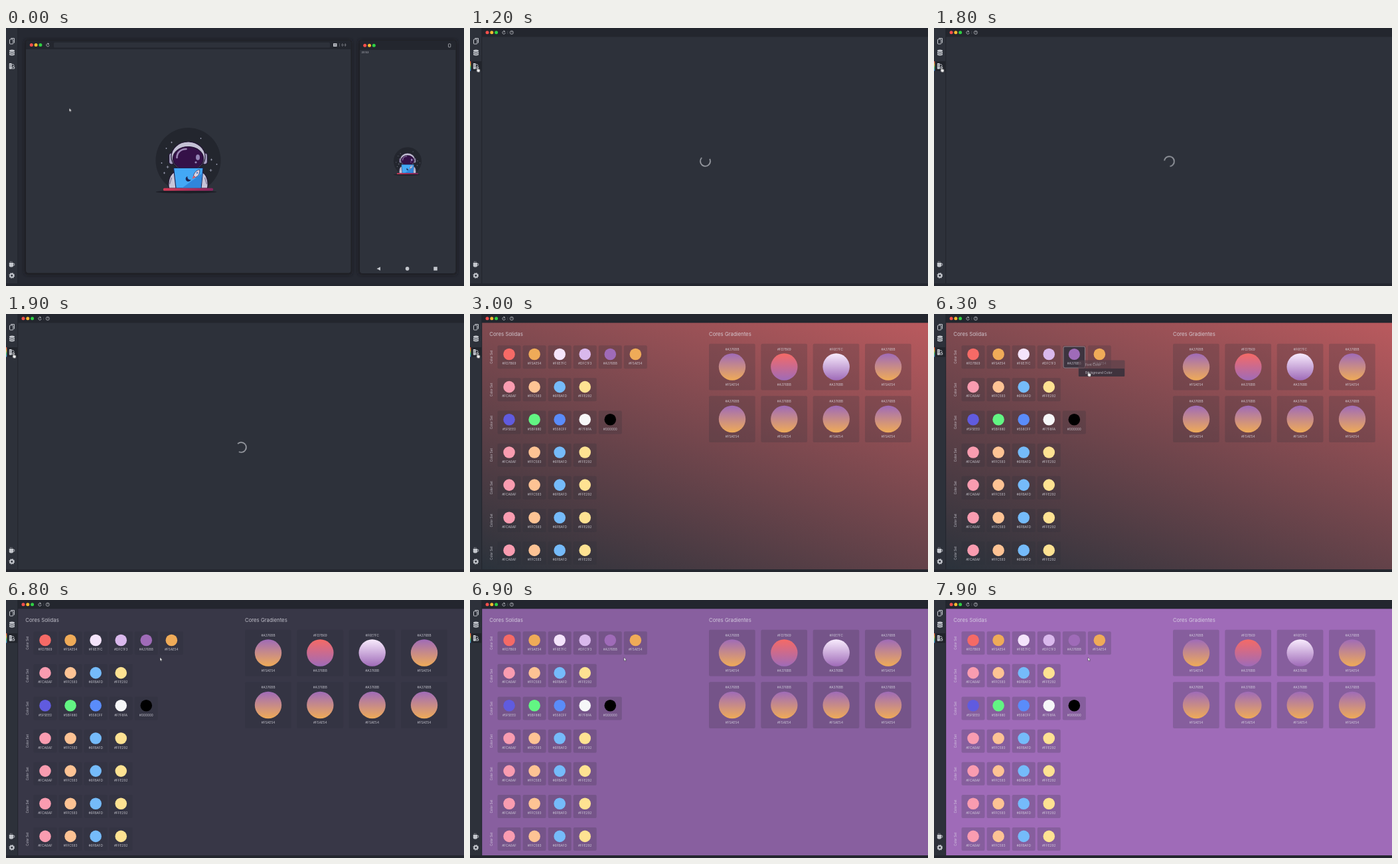
Write an HTML page that moves like this. It is 690 px wide and 388 px high and loops after 8 s.

```html
<!DOCTYPE html>
<html lang="pt">
<head>
<meta charset="utf-8">
<title>Color palette</title>
<style>
html, body { margin: 0; width: 100%; height: 100%; overflow: hidden; background: #262932; }
svg { display: block; width: 100%; height: 100%; }
text { font-family: Inter, "Open Sans", sans-serif; fill: #e3e4ec; fill-opacity: .8; }
.mid { text-anchor: middle; }
.tag { font-size: 4.75px; }
.head { font-size: 7.75px; }
.icon { fill: none; stroke: #c3c6cc; stroke-width: 1; }
.solid { fill: #c3c6cc; }
.card { fill: #2d313a; fill-opacity: .21; }

#home, #app, #wait, #board, #tint, #fade, #pick, #menu, #row, #hover, #bar, #arrow, #hand, #cur {
  animation: 8s step-end infinite;
}
#home { animation-name: home; }
#app, #bar { animation-name: app; }
#wait { animation-name: wait; }
#board { animation-name: board; }
#tint { animation-name: tint; }
#fade { animation-name: fade; }
#pick { animation-name: pick; }
#menu { animation-name: menu; }
#row { animation-name: row; }
#hover { animation-name: hover; }
#arrow { animation-name: arrow; }
#hand { animation-name: hand; }
#cur { animation-name: cur; animation-timing-function: ease-in-out; }
#spin { animation: spin 1s linear -.2s infinite; }

@keyframes home { 0% { opacity: 1 } 14.8%, 100% { opacity: 0 } }
@keyframes app { 0% { opacity: 0 } 14.8%, 100% { opacity: 1 } }
@keyframes wait { 0% { opacity: 0 } 14.8% { opacity: 1 } 24.8%, 100% { opacity: 0 } }
@keyframes board { 0% { opacity: 0 } 24.8%, 100% { opacity: 1 } }
@keyframes tint { 0% { opacity: 1 } 84.7%, 100% { opacity: 0 } }
@keyframes fade {
  0% { opacity: 0 }
  84.69% { opacity: 0; animation-timing-function: ease }
  87.8%, 100% { opacity: 1 }
}
@keyframes pick { 0% { opacity: 0 } 43.5% { opacity: 1 } 84.7%, 100% { opacity: 0 } }
@keyframes menu {
  0% { opacity: 0 }
  56% { opacity: 0; animation-timing-function: ease }
  58% { opacity: 1 }
  84.7%, 100% { opacity: 0 }
}
@keyframes row { 0% { opacity: 0 } 68.5%, 100% { opacity: 1 } }
@keyframes hover { 0% { opacity: 0 } 5.6%, 100% { opacity: 1 } }
@keyframes hand { 0% { opacity: 0 } 5.6% { opacity: 1 } 38.6% { opacity: 0 } 68.5% { opacity: 1 } 84.7%, 100% { opacity: 0 } }
@keyframes arrow { 0% { opacity: 1 } 5.6% { opacity: 0 } 38.6% { opacity: 1 } 68.5% { opacity: 0 } 84.7%, 100% { opacity: 1 } }
@keyframes cur {
  0%, .6% { transform: translate(95.3px, 120.5px) }
  6%, 37.8% { transform: translate(10.6px, 58.6px) }
  43.7% { transform: translate(206px, 64px) }
  48%, 62% { transform: translate(217.2px, 67.3px) }
  71%, 100% { transform: translate(232px, 86.3px) }
}
@keyframes spin { to { transform: rotate(360deg) } }
</style>
</head>
<body>
<svg viewBox="0 0 690 388" preserveAspectRatio="none">
  <defs>
    <!-- 20deg sweep across the 672 x 371 page -->
    <linearGradient id="warm" gradientUnits="userSpaceOnUse" x1="256" y1="472" x2="452" y2="-74">
      <stop offset="0" stop-color="#2a323b"/><stop offset="1" stop-color="#ba5a5e"/>
    </linearGradient>
    <linearGradient id="rainbow" x2="0" y2="1">
      <stop offset="0" stop-color="#f0524f"/><stop offset=".35" stop-color="#f3c44c"/>
      <stop offset=".65" stop-color="#4fd07a"/><stop offset="1" stop-color="#4d8df0"/>
    </linearGradient>
    <linearGradient id="desk">
      <stop offset="0" stop-color="#d63a55"/><stop offset="1" stop-color="#86245f"/>
    </linearGradient>
    <filter id="soft" x="-10%" y="-10%" width="120%" height="120%"><feGaussianBlur stdDeviation="2"/></filter>
    <g id="lights">
      <circle r="2.5" fill="#fb4f4b"/><circle cx="6.8" r="2.5" fill="#fbbb30"/><circle cx="13.6" r="2.5" fill="#2fd144"/>
    </g>
    <path id="reload" class="icon" stroke-width=".8" d="M1.6 -1.4A2.2 2.2 0 1 0 2.2 .4M-.2 -2.9L1.7 -1.5L-.2 -.4" style="stroke-width:.8"/>
    <g id="astro">
      <circle r="49" fill="#23262e"/>
      <g id="stars" stroke="#aeb1c6" stroke-width=".7"></g>
      <ellipse cx="-3" cy="47.5" rx="46" ry="2" fill="#1b1d25"/>
      <g stroke="#211432" stroke-width="1.2">
        <path d="M-19 17C-28 20 -31 32 -29 42H-17ZM19 17C28 20 31 32 29 42H17Z" fill="#c8c5d8"/>
        <rect x="-29" y="-11" width="8" height="17" rx="4" fill="#a5a1c0"/>
        <rect x="21" y="-11" width="8" height="17" rx="4" fill="#a5a1c0"/>
        <ellipse cy="-6" rx="25.5" ry="22" fill="#c4c1d5"/>
        <ellipse cy="-3" rx="23" ry="17.5" fill="#351148"/>
      </g>
      <path d="M-17 -4C-17 -12 -11 -17 -3 -17" fill="none" stroke="#9c86b5" stroke-width="2.6" stroke-linecap="round"/>
      <path d="M-25 26L-28 36M25 26L28 36" stroke="#7d7897" stroke-width="1.2"/>
      <ellipse cx="14.5" cy="-4.5" rx="3" ry="4.3" fill="#9484b5"/><circle cx="11.5" cy="3" r="1.6" fill="#9484b5"/>
      <path d="M-22 11.5H22.5L19.5 42H-18.5Z" fill="#43a8f6" stroke="#1b2250" stroke-width="1.2" stroke-linejoin="round"/>
      <path d="M21.7 19L19 41.4H-9Z" fill="#2f86dc"/>
      <path d="M-1 24A4 4 0 1 0 4 29A4 4 0 0 1 -1 24Z" fill="#1c2352"/>
      <path d="M17 14C12 15 9 19 8 23L11 25.500C15 24 18 20 17 14Z" fill="#d5d3e4" stroke="#3a2346" stroke-width=".7"/>
      <path d="M8 23L6 28L11 25.500Z" fill="#e85a5f"/><circle cx="13.500" cy="18.800" r="1.300" fill="#4b79c4"/>
      <rect x="-37.500" y="41.700" width="75" height="4" rx="1.500" fill="url(#desk)"/>
    </g>
  </defs>

  <rect width="690" height="388" fill="#262932"/>

  <g id="home">
    <rect x="28" y="18" width="493" height="353" rx="4" fill="#1b1d24" filter="url(#soft)"/>
    <rect x="531" y="18" width="148" height="353" rx="4" fill="#1b1d24" filter="url(#soft)"/>
    <rect x="30" y="19" width="489.500" height="349.500" rx="4" fill="#2e323b"/>
    <path d="M30 32V23Q30 19 34 19H515.500Q519.500 19 519.500 23V32Z" fill="#23262e"/>
    <rect x="72" y="21.800" width="416" height="7.600" rx="1.500" fill="#2d313a"/>
    <use href="#lights" x="38.300" y="25.500"/>
    <use href="#reload" x="63" y="25.500"/>
    <rect x="493" y="23" width="5.500" height="5" rx=".6" class="solid"/>
    <path d="M494.300 24.500H497.200M494.300 26.300H497.200" stroke="#3c4049" stroke-width=".7"/>
    <path d="M502.500 23V28" stroke="#70747c" stroke-width=".6"/>
    <path class="icon" style="stroke-width:.7" d="M507 23.500Q505.500 25.500 507 27.500M511 23.500Q512.500 25.500 511 27.500M508 25.600H508.700M509.400 25.600H510.100"/>
    <rect x="533" y="19" width="144.500" height="350" rx="4" fill="#2e323b"/>
    <path d="M533 33V23Q533 19 537 19H673.500Q677.500 19 677.500 23V33Z" fill="#23262e"/>
    <use href="#lights" x="540.700" y="26.300"/>
    <rect class="icon" style="stroke-width:.7" x="666.500" y="23.800" width="3.300" height="5" rx=".6"/>
    <text x="535.500" y="37.600" font-size="4">20:53</text>
    <path class="solid" d="M558.500 362L564 359.200V364.800Z"/>
    <circle class="solid" cx="604.600" cy="361.900" r="2.800"/>
    <rect class="solid" x="644.300" y="359.200" width="5.500" height="5.500"/>
    <use href="#astro" transform="translate(274.500 199)"/>
    <use href="#astro" transform="translate(605 200.300) scale(.43)"/>
  </g>

  <g id="app">
    <rect x="18" width="672" height="388" fill="#2d313a"/>
    <g id="wait">
      <g transform="translate(354.500 200.500)">
        <path id="spin" class="icon" style="stroke-width:1.200" d="M-7.500 -1A7.500 7.500 0 1 1 1 7.500"/>
      </g>
    </g>
    <g id="board">
      <rect id="tint" x="18" y="13" width="672" height="371" fill="url(#warm)"/>
      <rect id="fade" x="18" y="13" width="672" height="371" fill="#9f6bb8"/>
      <text class="head" x="29.300" y="33.200">Cores Solidas</text>
      <text class="head" x="360" y="33.200">Cores Gradientes</text>
      <g id="cards"></g>
      <g id="pick">
        <rect x="195" y="49" width="32.500" height="32" rx="2" fill="#3d343f" stroke="#9d9098" stroke-width=".8"/>
        <circle cx="211.300" cy="60.500" r="8.600" fill="#9f6bb8"/>
        <text class="tag mid" x="211.300" y="76.100">#A376BB</text>
      </g>
      <g id="menu">
        <rect x="217.500" y="69.500" width="70" height="24.500" rx="1.500" fill="#54404a" fill-opacity=".62"/>
        <rect id="row" x="218" y="82" width="69" height="12" rx="1" fill="#40333d"/>
        <text class="tag" x="228" y="77.500" opacity=".8">Font Color</text>
        <text class="tag" x="228" y="89.700">Background Color</text>
      </g>
    </g>
    <rect x="18" width="672" height="13.300" fill="#23262e"/>
    <use href="#lights" x="26" y="6.800"/>
    <use href="#reload" x="51" y="6.800"/>
    <path d="M56.800 4.500V9" stroke="#5a5e67" stroke-width=".6"/>
    <circle class="icon" style="stroke-width:.7" cx="62.800" cy="6.800" r="2.600"/>
    <path class="icon" style="stroke-width:.6" d="M62 6.200Q62.100 5.300 62.900 5.300Q63.800 5.500 63.600 6.300L62.900 7V7.400M62.900 8V8.500"/>
  </g>

  <g id="side">
    <rect width="17.500" height="388" fill="#2d313a"/>
    <path d="M17.800 0V388" stroke="#22252d" stroke-width=".7"/>
    <rect id="hover" y="50" width="17.500" height="14.500" fill="#21242b"/>
    <rect id="bar" y="50" width="1.300" height="14.500" fill="url(#rainbow)"/>
    <g class="icon">
      <rect x="5.500" y="17" width="5.300" height="7" rx=".8"/>
      <path d="M7.300 15.500H12.500V22.500"/>
      <path d="M5.300 53.500H8.200V61H5.300ZM8.500 56L10.300 54.200L12.300 56.300L8.500 60.200M10.800 58.500H12.700V61H8.500"/>
      <path d="M10.800 354.300H12.700V357H10.800M6.500 350.800V352.300M8.800 350.800V352.300" stroke-width=".8"/>
    </g>
    <path class="solid" d="M5 53H8.300V61.500H5Z"/>
    <path d="M5.500 55.500H7.800M5.500 58H7.800" stroke="#2d313a" stroke-width=".6"/>
    <path class="solid" d="M5 34.200A4 1.700 0 0 1 13 34.200V39.800A4 1.700 0 0 1 5 39.800Z"/>
    <path d="M5 35A4 1.500 0 0 0 13 35M5 37.700A4 1.500 0 0 0 13 37.700" fill="none" stroke="#2d313a" stroke-width=".8"/>
    <path class="solid" d="M4.800 353H11V357.500Q11 359.500 9 359.500H6.800Q4.800 359.500 4.800 357.500Z"/>
    <circle cx="8.800" cy="372.300" r="2.500" fill="none" stroke="#c3c6cc" stroke-width="2"/>
    <circle cx="8.800" cy="372.300" r="3.700" fill="none" stroke="#c3c6cc" stroke-width="1.200" stroke-dasharray="1.450 1.456"/>
  </g>
  <rect y="384" width="690" height="4" fill="#24272f"/>

  <g id="cur">
    <path id="arrow" d="M0 0V5.200L1.200 4.200L2 6L2.900 5.600L2.100 3.900H3.700Z" fill="#fff" stroke="#16181d" stroke-width=".4"/>
    <path id="hand" d="M0 .6Q.6 -.4 1.200 .6V3L3.800 3.500Q4.700 3.800 4.500 4.900L3.900 7.800H.8L-1 5.200Q-1.200 4.300 -.2 4.500L0 4.800Z" fill="#fff" stroke="#16181d" stroke-width=".4"/>
  </g>
</svg>
<script>
const byId = id => document.getElementById(id);
const tag = (x, y, s) => `<text class="tag mid" x="${x}" y="${y}">${s}</text>`;
const card = (x, y, w, h) => `<rect class="card" x="${x}" y="${y}" width="${w}" height="${h}" rx="2"/>`;

const soft = ['FCA6AF:f99cb0', 'FFC593:fdc394', '6FBAFD:75bbfa', 'FFE292:fee292'];
const sets = [
  ['FD7B69:f56a66', 'F5AE54:efab58', 'F6E7FC:f4e4fb', 'DFC1F3:d9b8ec', 'A376BB:9f6bb8', 'F5AE54:efab58'],
  soft,
  ['5F5EE0:605bdf', '5BF880:62f583', '558CFF:5a8cfa', 'F7F8FA:f6f7f8', '000000:000000'],
  soft, soft, soft, soft
];

let out = '';
sets.forEach((set, r) => {
  const y = 60.5 + r * 49.15;
  out += `<text class="mid" font-size="4.6" transform="translate(34.3 ${y + 4.2}) rotate(-90)">Color Set</text>`;
  set.forEach((item, c) => {
    const [name, fill] = item.split(':'), x = 59 + c * 38.07;
    out += card(x - 17.5, y - 13.3, 35, 35) +
      `<circle cx="${x}" cy="${y}" r="8.8" fill="#${fill}"/>` + tag(x, y + 15.7, '#' + name);
  });
});

const shade = { A376BB: '#9f6bb8', F5AE54: '#efab58', FD7B69: '#f56a66', F6E7FC: '#f8ebfd' };
const blend = (x, y, top, end, i) =>
  `<linearGradient id="mix${i}" x2="0" y2="1"><stop offset="0" stop-color="${shade[top]}"/>` +
  `<stop offset="1" stop-color="${shade[end]}"/></linearGradient>` +
  card(x - 35, y - 34.8, 69.7, 69.7) +
  `<circle cx="${x}" cy="${y}" r="20.2" fill="url(#mix${i})"/>` +
  tag(x, y - 25, '#' + top) + tag(x, y + 28.2, '#' + end);

for (let i = 0; i < 8; i++) {
  const top = i === 1 ? 'FD7B69' : i === 2 ? 'F6E7FC' : 'A376BB';
  const end = i === 1 || i === 2 ? 'A376BB' : 'F5AE54';
  out += blend(395 + (i % 4) * 78.35, 79.5 + (i >> 2) * 78.5, top, end, i);
}
byId('cards').innerHTML = out;

const stars = [[19, -33, 1], [-33, -18, 1], [-25, -27, 1.2], [35, -1, 1.5], [43, 6, 1], [-31, 10, 2], [-36, 19, 1.5], [34, 15, 2], [-40, 4, 1]];
byId('stars').innerHTML = stars.map(([x, y, r]) =>
  `<path d="M${x - r} ${y}h${2 * r}M${x} ${y - r}v${2 * r}"/>`).join('');
</script>
</body>
</html>
```
